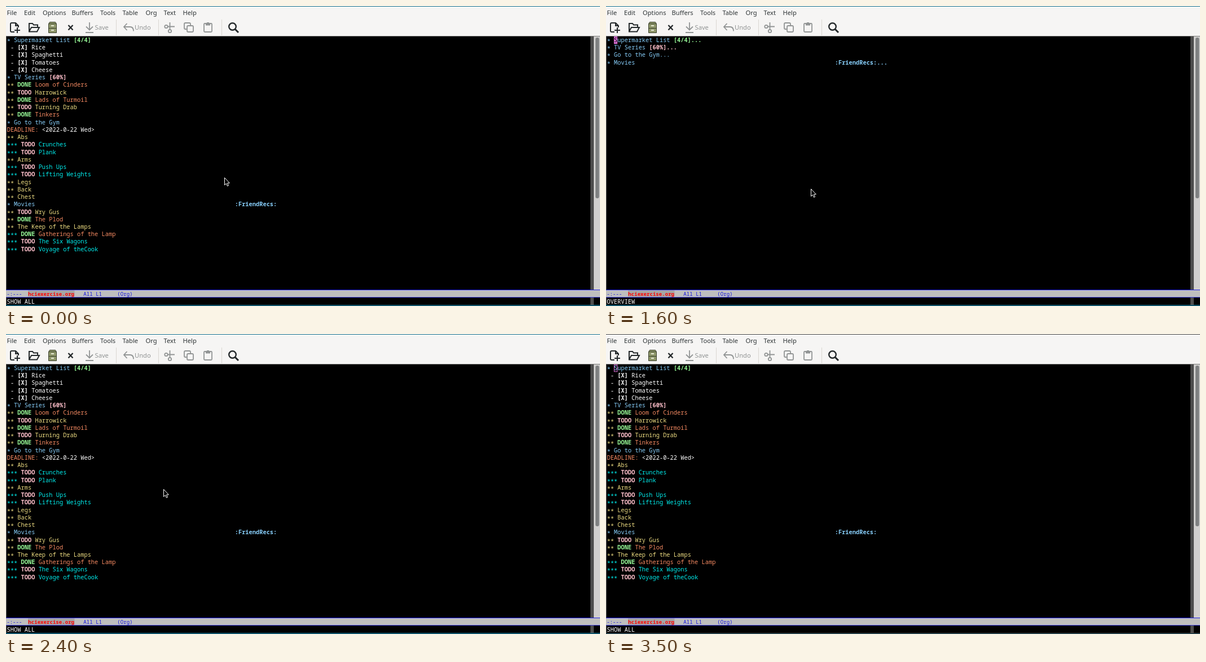
Recreate the animation shown at these times as an HTML page. Size 1053 by 532 pixels, loop 4400 ms.

```html
<!DOCTYPE html>
<html lang="en">
<head>
<meta charset="utf-8">
<title>Org outline cycling</title>
<style>
  html, body { margin: 0; width: 100%; height: 100%; overflow: hidden; background: #000; }
  svg { display: block; width: 100%; height: 100%; }
  text { white-space: pre; }
  .mono { font: 10.37px "Noto Sans Mono", "DejaVu Sans Mono", monospace; }
  .mode { font-size: 9.08px; }
  .menu { font: 11.2px "Noto Sans", "Open Sans", sans-serif; fill: #2e3436; }
  .icon { fill: none; stroke: #24292b; stroke-width: 2; }
  .off { stroke: #929595; stroke-width: 1.8; }
  .bold { font-weight: 700; }
</style>
</head>
<body>
<svg viewBox="0 0 1053 532">
  <rect width="1053" height="532"/>
  <rect y="1" width="1053" height="52.5" fill="#f6f5f4"/>
  <g id="menu" class="menu"></g>

  <g class="icon">
    <path d="M15 46H10Q8 46 8 44V32Q8 30 10 30H17L22 35V38M17 30V35H22M20 38V48M15 43H25"/>
    <path d="M41 45V31H47L49 33.5H56V37M41 45L45 38H59L55 45.5H41Z"/>
    <path d="M110.5 34L118.5 42.5M118.5 34L110.5 42.5" stroke-width="2.4"/>
    <circle cx="401.5" cy="36.5" r="6.3" stroke-width="2.4"/>
    <path d="M406 41L412 47" stroke-width="3"/>
  </g>
  <g stroke="#3a3f2c">
    <path d="M75.5 31.5L77.5 28.5H87.5L89.5 31.5V47.5H75.5Z" fill="#8d9669"/>
    <path d="M76 31.5H89M76 39.5H89" fill="none"/>
    <path d="M80 35H85M80 43H85" stroke="#e4e6d4" stroke-width="2"/>
  </g>
  <g class="icon off">
    <path d="M148 29V42M142 36.5L148 42.5L154 36.5M141 47H155"/>
    <path d="M214.5 31L209 37L214.5 43M209 37H220Q226 37 226 44.5"/>
    <circle cx="284" cy="36.5" r="2.7"/>
    <circle cx="290.5" cy="44.5" r="2.7"/>
    <path d="M287 36.5H299M290.5 42V29"/>
    <path d="M327 34V32Q327 30 325 30H318Q316 30 316 32V39Q316 41 318 41H320"/>
    <rect x="321" y="35" width="11" height="11" rx="2"/>
    <rect x="351" y="31" width="14" height="15" rx="1.5"/>
    <path d="M354 32.5H362M358 29V32" stroke-width="4"/>
  </g>
  <path d="M195.5 24V52M270.5 24V52M382.5 24V52" stroke="#dad6d2"/>
  <g class="menu" style="fill:#929595">
    <text x="157.5" y="42">Save</text>
    <text x="228" y="42">Undo</text>
  </g>

  <path d="M0 54H1.3V531H0ZM1036 54H1042V531H1036Z" fill="#4d4d4d"/>
  <rect x="1042" y="54" width="11" height="450" fill="#cfcecd"/>
  <rect x="1045" y="56" width="6.5" height="285" rx="3.2" fill="#7e8081"/>

  <g id="views" class="mono"></g>
  <g id="block">
    <rect x="14" y="54" width="6.2" height="13.2" fill="#da70d6"/>
    <text class="mono" x="14.1" y="64">S</text>
  </g>
  <rect id="hollow" x="14.5" y="54.5" width="5.4" height="12.2" fill="none" stroke="#da70d6"/>

  <rect y="503" width="1053" height="14" fill="#2222e6"/>
  <rect y="504" width="1053" height="12.2" fill="#bfbfbf"/>
  <rect x="39" y="504" width="82.5" height="12" fill="#a6a6a6"/>
  <text class="mono mode" x="1.2" y="513.5" fill="#1414e0">-:---  <tspan class="bold" fill="#f00">hciexercise.org</tspan>   All L1     (Org)</text>
  <text id="echo" class="mono" x="1.6" y="527.5" fill="#fff"></text>

  <rect y="531" width="1053" height="1" fill="#0b3a4a"/>
  <path id="border" d="M0 0H1053V1H0ZM0 530H1053V531H0Z"/>
  <path id="mouse" d="M.5 .5V13.5L3.4 10.8L5.4 15.3L7.5 14.4L5.5 10H9.4Z" stroke="#fff"/>
</svg>

<script>
const LOOP = 4400, STEP = 100, ROW = 13.24, LEFT = 1.7, STAR_DROP = 2;
const $ = id => document.getElementById(id);

function add(parent, tag, attrs, content = '') {
  const el = document.createElementNS('http://www.w3.org/2000/svg', tag);
  for (const key in attrs) el.setAttribute(key, attrs[key]);
  el.textContent = content;
  return parent.appendChild(el);
}

const menus = { File: 1.5, Edit: 32, Options: 65, Buffers: 116.5, Tools: 167,
                Table: 206.5, Org: 247.5, Text: 279.5, Help: 313.5 };
for (const name in menus) add($('menu'), 'text', { x: menus[name], y: 16 }, name);

// Each run starts with a colour key; capitals are bold.
const colors = { b: '#87cefa', y: '#eedd82', c: '#00eeee', s: '#f58a62',
                 g: '#98fb98', p: '#ffc0cb', w: '#ffffff' };
const levelKey = level => ({ 1: 'b', 2: 'y', 3: 'c' })[level];
const stars = level => levelKey(level) + '*'.repeat(level);
const item = name => `w - |W[X]|w ${name}`;
const head = (level, name) => `${stars(level)}|${levelKey(level)} ${name}`;
const todo = (level, name) => `${stars(level)}|P TODO|${levelKey(level)} ${name}`;
const done = (level, name) => `${stars(level)}|G DONE|s ${name}`;

const outline = [
  head(1, 'Supermarket List |G[4/4]'),
  ...['Rice', 'Spaghetti', 'Tomatoes', 'Cheese'].map(item),
  head(1, 'TV Series |P[60%]'),
  done(2, 'Loom of Cinders'),
  todo(2, 'Harrowick'),
  done(2, 'Lads of Turmoil'),
  todo(2, 'Turning Drab'),
  done(2, 'Tinkers'),
  head(1, 'Go to the Gym'),
  'sDEADLINE:|w <2022-0-22 Wed>',
  head(2, 'Abs'), todo(3, 'Crunches'), todo(3, 'Plank'),
  head(2, 'Arms'), todo(3, 'Push Ups'), todo(3, 'Lifting Weights'),
  head(2, 'Legs'), head(2, 'Back'), head(2, 'Chest'),
  head(1, 'Movies'.padEnd(63) + '|B:FriendRecs:'),
  todo(2, 'Wry Gus'),
  done(2, 'The Plod'),
  head(2, 'The Keep of the Lamps'),
  done(3, 'Gatherings of the Lamp'),
  todo(3, 'The Six Wagons'),
  todo(3, 'Voyage of theCook')
];
const levelOf = line => line.match(/^.(\**)/)[1].length;

const filters = {
  'OVERVIEW': level => level === 1,
  'CONTENTS': level => level > 0,
  'SHOW ALL': () => true
};

function addLine(group, line, row) {
  const text = add(group, 'text', { x: LEFT, y: 64 + ROW * row });
  const drop = levelOf(line) ? STAR_DROP : 0;
  line.split('|').forEach((run, i) => {
    const key = run[0].toLowerCase();
    add(text, 'tspan', {
      fill: colors[key],
      class: key === run[0] ? '' : 'bold',
      dy: [drop, -drop][i] || 0
    }, run.slice(1));
  });
}

const views = {};
for (const name in filters) {
  const shown = line => filters[name](levelOf(line));
  const group = views[name] = add($('views'), 'g', {});
  let row = 0;
  outline.forEach((line, i) => {
    if (!shown(line)) return;
    const folded = i + 1 < outline.length && !shown(outline[i + 1]);
    addLine(group, line + (folded ? '...' : ''), row++);
  });
}

const viewTimes = [[0, 'SHOW ALL'], [1300, 'OVERVIEW'], [1700, 'CONTENTS'], [1900, 'SHOW ALL'],
                   [3100, 'OVERVIEW'], [3200, 'CONTENTS'], [3400, 'SHOW ALL']];
const blinkTimes = [[0, false], [200, true], [700, false], [1200, true], [2400, false], [3100, true]];
const mousePath = [[0, 387, 304], [100, 436, 300], [200, 484, 297], [300, 502, 300], [500, 410, 315],
                   [600, 369, 321], [700, 366, 327], [800, 363, 324], [1600, 363, 324],
                   [1900, 324, 293], [2000, 324, 293], [2300, 284, 277], [2400, 279, 275],
                   [3000, 279, 275], [3100, 279, 274]];

const valueAt = (list, t) => list.filter(([start]) => start <= t).pop()[1];

function mouseAt(t) {
  const next = mousePath.findIndex(([time]) => time > t);
  if (next < 0) return mousePath[mousePath.length - 1].slice(1);
  const [t0, x0, y0] = mousePath[next - 1], [t1, x1, y1] = mousePath[next];
  const k = (t - t0) / (t1 - t0);
  return [Math.round(x0 + (x1 - x0) * k), Math.round(y0 + (y1 - y0) * k)];
}

const show = (el, on) => { el.style.display = on ? '' : 'none'; };

function draw(now) {
  const t = Math.floor((now % LOOP) / STEP) * STEP;
  const focused = t < 3500, view = valueAt(viewTimes, t);
  for (const name in views) show(views[name], name === view);
  $('echo').textContent = view;
  show($('block'), focused && valueAt(blinkTimes, t));
  show($('hollow'), !focused);
  show($('mouse'), focused);
  $('mouse').setAttribute('transform', `translate(${mouseAt(t)})`);
  $('border').setAttribute('fill', focused ? '#14708f' : '#444');
}

function tick() {
  draw(performance.now());
  requestAnimationFrame(tick);
}
tick();
</script>
</body>
</html>
```
